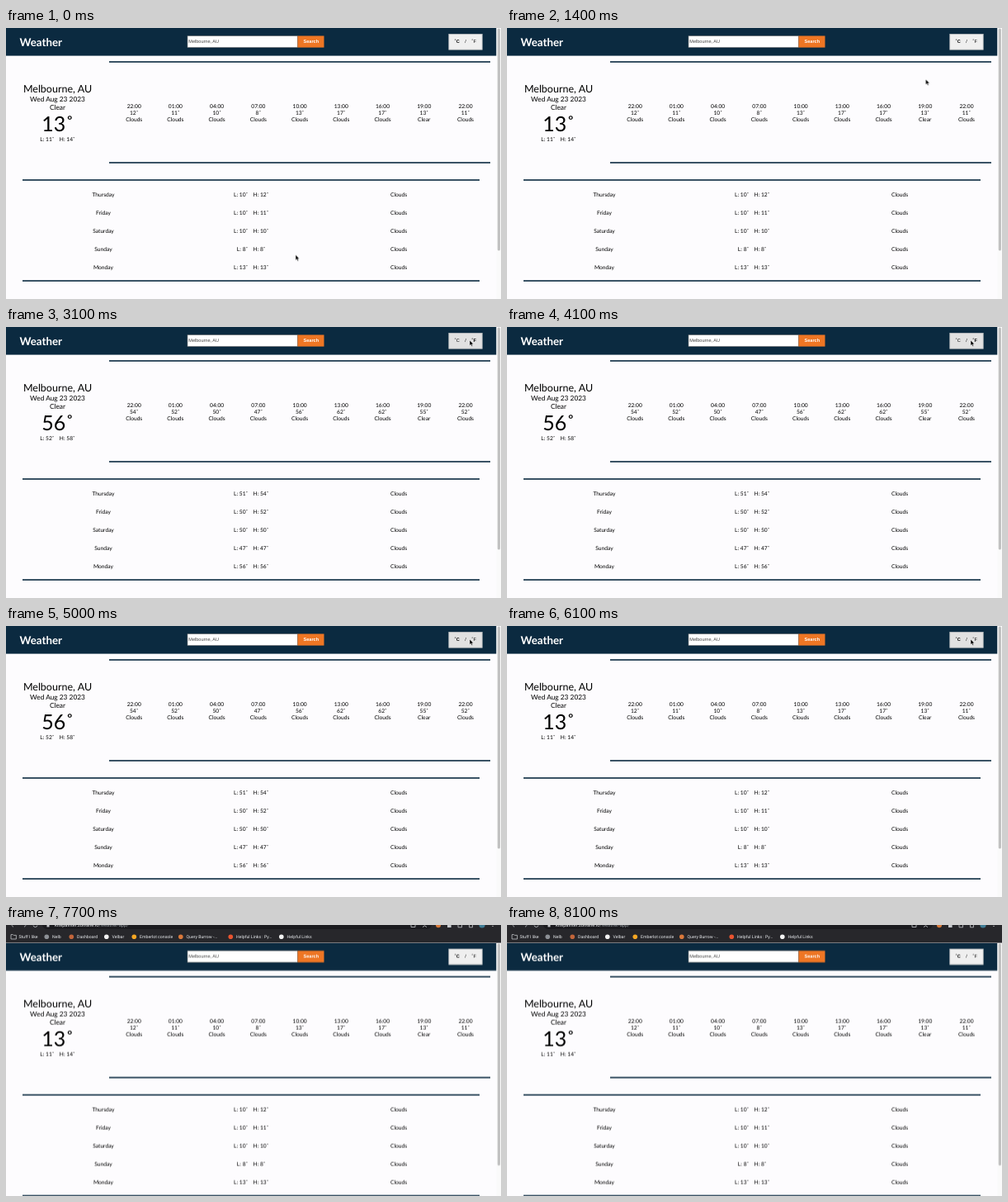
Recreate the animation shown at these times as an HTML page. Size 600x328 px, loop 8500 ms.

```html
<!DOCTYPE html>
<html lang="en">
<head>
<meta charset="utf-8">
<title>Weather</title>
<style>
  html, body { margin: 0; width: 100%; height: 100%; overflow: hidden; background: #fdfcfe; }
  svg { display: block; width: 600px; height: 328px; text-rendering: geometricPrecision; }
  text { font: 6.67px Lato, sans-serif; fill: #000; text-anchor: middle; }
  .start { text-anchor: start; }
  .ui { font: 5.55px "Liberation Sans", Arial, sans-serif; }
  .bold { font-weight: 700; }
  .title { font-size: 13.33px; font-weight: 700; fill: #fff; }
  .city { font-size: 12.5px; }
  .sub { font-size: 8.33px; }
  .big { font-size: 25px; }
  .bar text { font: 5.2px Roboto, sans-serif; fill: #e8eaed; text-anchor: start; }
  .bar .url { font-size: 5.7px; }
  .navy { fill: #0b2a40; }

  /* One shared 8.5 s loop; every change is a hard cut. */
  .page, .bar, .celsius, .fahrenheit, .toggle, .unit-on, .unit-off, .cursor {
    animation: 8.5s step-end infinite;
  }
  .page { animation-name: drop; }
  .bar { animation-name: bar; }
  .celsius { animation-name: celsius; }
  .fahrenheit { animation-name: fahrenheit; }
  .toggle { animation-name: hover; }
  .unit-on { animation-name: unit-on; }
  .unit-off { animation-name: unit-off; }
  .cursor { animation-name: cursor; }

  @keyframes drop { 0% { transform: none; } 90.58%, 100% { transform: translateY(21.6px); } }
  @keyframes bar { 0% { opacity: 0; } 90.58%, 100% { opacity: 1; } }
  @keyframes celsius { 0% { opacity: 1; } 34.11% { opacity: 0; } 64.7%, 100% { opacity: 1; } }
  @keyframes fahrenheit { 0% { opacity: 0; } 34.11% { opacity: 1; } 64.7%, 100% { opacity: 0; } }
  @keyframes hover { 0% { fill: #efefef; } 18.82% { fill: #e1e1e1; } 88.23%, 100% { fill: #efefef; } }
  @keyframes unit-on { 0% { font-weight: 700; } 28.23% { font-weight: 400; } 56.47%, 100% { font-weight: 700; } }
  @keyframes unit-off { 0% { font-weight: 400; } 28.23% { font-weight: 700; } 56.47%, 100% { font-weight: 400; } }
  @keyframes cursor {
    0% { transform: translate(351px, 274.5px); opacity: 1; }
    8.23% { transform: translate(356px, 268px); }
    9.41% { transform: translate(371px, 250px); }
    10.58% { transform: translate(393px, 222px); }
    11.76% { transform: translate(418px, 189px); }
    12.94% { transform: translate(444px, 154px); }
    14.11% { transform: translate(468px, 119px); }
    15.29% { transform: translate(489px, 89px); }
    16.47% { transform: translate(507.5px, 62px); }
    17.64% { transform: translate(541px, 27px); }
    18.82% { transform: translate(553px, 20px); }
    20% { transform: translate(560px, 17px); }
    21.17% { transform: translate(562px, 16px); opacity: 1; }
    88.23%, 100% { transform: translate(562px, 16px); opacity: 0; }
  }
</style>
</head>
<body>
<svg viewBox="0 0 600 328">
  <rect width="600" height="328" fill="#fdfcfe"/>

  <g class="page">
    <rect class="navy" width="594.5" height="33.6"/>
    <text class="title start" x="16.5" y="21.6">Weather</text>
    <rect x="220" y="9.7" width="133.3" height="13.8" fill="#fff" stroke="#777" stroke-width=".6"/>
    <text class="ui start" x="221.3" y="18.3" style="fill:#444">Melbourne, AU</text>
    <rect x="353.5" y="9.5" width="32" height="14.1" fill="#ee7624"/>
    <text class="ui bold" x="369.8" y="18.4" style="fill:#fff">Search</text>

    <rect class="toggle" x="536.8" y="7.4" width="40.4" height="18.8" stroke="#b9bcbe" stroke-width=".8"/>
    <text class="ui unit-on" x="546.8" y="18.4">˚C</text>
    <text class="ui" x="557" y="18.4">/</text>
    <text class="ui unit-off" x="567.2" y="18.4">˚F</text>

    <g class="navy">
      <rect x="125" y="40.2" width="462" height="1.6"/>
      <rect x="125" y="162.2" width="462" height="1.6"/>
      <rect x="20" y="183.2" width="554" height="1.6"/>
      <rect x="20" y="305.2" width="554" height="1.6"/>
    </g>

    <text class="city" x="62.5" y="78">Melbourne, AU</text>
    <text class="sub" x="62.5" y="88.7">Wed Aug 23 2023</text>
    <text class="sub" x="62.5" y="98.7">Clear</text>
    <g id="labels"></g>
    <g id="celsius" class="celsius"></g>
    <g id="fahrenheit" class="fahrenheit"></g>

    <rect x="594.5" width="5.5" height="328" fill="#fafafa"/>
    <rect x="595.8" y=".6" width="3.2" height="269" rx="1.6" fill="#c1c1c1"/>
  </g>

  <g class="bar">
    <rect width="600" height="21.6" fill="#27272b"/>
    <rect x="44" y="-9" width="472" height="14" rx="6" fill="#1b1b1f"/>
    <g fill="none" stroke="#c6c8cc" stroke-width=".8">
      <path d="M6.5 0 9 2.4M24.5 0 22 2.4M33 .6a2.6 2.6 0 0 0 5 0"/>
      <path d="M491 0V2.5H496V0M505 2.6 507.5 .8 510 2.6"/>
      <path d="M548 0V2.8H552.5V0M561.5 0V2.8H565.5V0"/>
    </g>
    <rect x="49.5" y="-1" width="3" height="3.4" fill="#c6c8cc"/>
    <circle cx="524" cy=".2" r="3" fill="#d87a3a"/>
    <rect x="535" y="-1" width="4.6" height="4" fill="#c6c8cc"/>
    <circle cx="577" cy="0" r="3.6" fill="#3f7d96"/>
    <circle cx="590" cy="1.4" r=".7" fill="#c6c8cc"/>
    <text class="url" x="59" y="2">kitepainter.zolvane.io<tspan fill="#9aa0a6">/weather-app/</tspan></text>
    <path d="M6 11.6H8.4L9.2 12.4H12.4V17H6Z" fill="none" stroke="#d5d7da" stroke-width=".7"/>
    <g id="marks"></g>
  </g>

  <path class="cursor" d="M0 0V6.5L1.5 5.2 2.5 7.5 3.7 7 2.7 4.8H4.7Z" stroke="#fff" stroke-width=".5"/>
</svg>

<script>
  const ring = '˚';
  const byId = id => document.getElementById(id);
  const text = (x, y, body, cls = '') => `<text class="${cls}" x="${x}" y="${y}">${body}</text>`;
  const range = (lo, hi) => `L: ${lo}${ring}<tspan dx="6.4">H: ${hi}${ring}</tspan>`;
  const hourX = i => 155.2 + i * 50.22;
  const dayY = i => 203.7 + i * 22.1;

  const days = ['Thursday', 'Friday', 'Saturday', 'Sunday', 'Monday'];
  const hours = ['22', '01', '04', '07', '10', '13', '16', '19', '22'];

  byId('labels').innerHTML =
    hours.map((h, i) =>
      text(hourX(i), 96.9, h + ':00') +
      text(hourX(i), 112.8, i === 7 ? 'Clear' : 'Clouds')).join('') +
    days.map((d, i) => text(118, dayY(i), d) + text(476, dayY(i), 'Clouds')).join('');

  function fill(id, { now, lo, hi, hourly, daily }) {
    byId(id).innerHTML =
      text(62.7, 125.2, now + ring, 'big') +
      text(62.5, 137.1, range(lo, hi)) +
      hourly.map((t, i) => text(hourX(i), 104.8, t + ring)).join('') +
      daily.map(([a, b], i) => text(297.2, dayY(i), range(a, b))).join('');
  }

  fill('celsius', {
    now: 13, lo: 11, hi: 14,
    hourly: [12, 11, 10, 8, 13, 17, 17, 13, 11],
    daily: [[10, 12], [10, 11], [10, 10], [8, 8], [13, 13]]
  });
  fill('fahrenheit', {
    now: 56, lo: 52, hi: 58,
    hourly: [54, 52, 50, 47, 56, 62, 62, 55, 52],
    daily: [[51, 54], [50, 52], [50, 50], [47, 47], [56, 56]]
  });

  const marks = [
    [15.5, 'Stuff I like'],
    [56, 'Nelb', '#8c9096'],
    [86, 'Dashboard', '#c2653a'],
    [128.5, 'Velbar', '#f1f1f1'],
    [162, 'Emberlot console', '#f5a623'],
    [218.5, 'Query Burrow -...', '#d9783a'],
    [279, 'Helpful Links : Py...', '#e8532f'],
    [340.5, 'Helpful Links', '#f1f1f1']
  ];
  byId('marks').innerHTML = marks.map(([x, name, color]) =>
    (color ? `<circle cx="${x - 6.7}" cy="14.3" r="2.8" fill="${color}"/>` : '') +
    text(x, 16.1, name)).join('');
</script>
</body>
</html>
```
